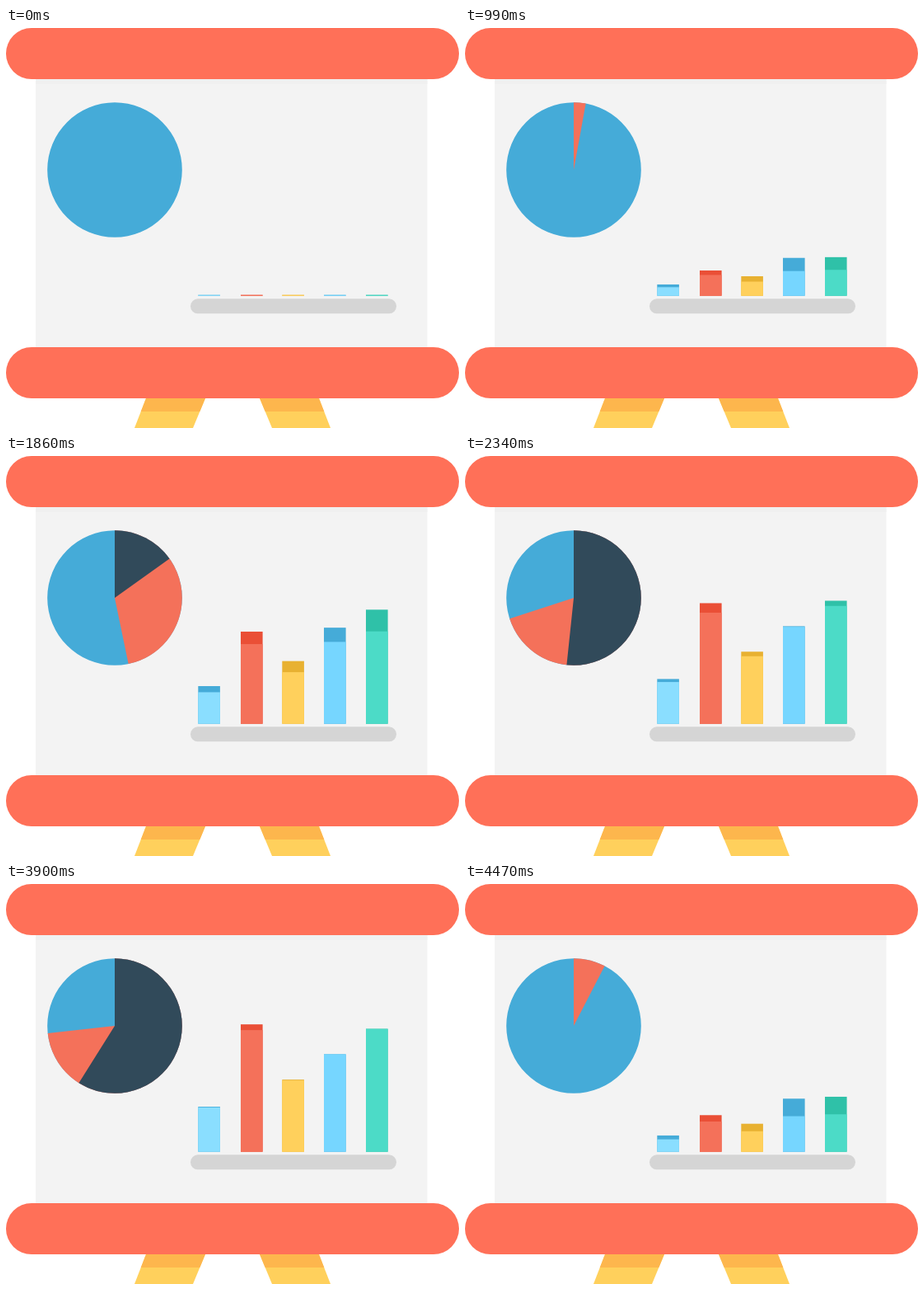
Write an HTML page with a canvas that moves like this. It is 550x485 px and loops after 4.5 s.

```html
<!DOCTYPE html>
<html lang="en">
<head>
<meta charset="utf-8">
<title>Presentation board</title>
<style>
  html, body { margin: 0; width: 100%; height: 100%; overflow: hidden; background: #fff; }
  canvas { display: block; width: 550px; height: 485px; }
</style>
</head>
<body>
<canvas id="stage" width="550" height="485"></canvas>
<script>
const ctx = document.getElementById('stage').getContext('2d');

const LOOP = 4500, STEP = 30;
const BUILD_END = 3030, REWIND_START = 3780, REWIND_RATE = 2.5;
const BAR_START = 100, BAR_BASE = 324.7;
const PIE = { x: 132, y: 172, r: 81.8 };
const BLUE = '#45abd8', RED = '#f4715a', DARK = '#314a5a', BOARD = '#ff7058';

// Each bar has a shaded bar that rises first and a light one that catches up.
const bars = [
  { x: 233.3, top: 270, shade: BLUE, fill: '#8adeff', shadeEnd: 2470, fillEnd: 2810 },
  { x: 285, top: 168.5, shade: '#ea4f36', fill: RED, shadeEnd: 2770, fillEnd: 3030 },
  { x: 335.3, top: 237.2, shade: '#e8b131', fill: '#ffd05c', shadeEnd: 2385, fillEnd: 2770 },
  { x: 386, top: 206.4, shade: BLUE, fill: '#76d6ff', shadeEnd: 2010, fillEnd: 2460 },
  { x: 437, top: 175.5, shade: '#2fc1a8', fill: '#4cdbc7', shadeEnd: 2225, fillEnd: 2680 }
];

// cubic-bezier(.464, 0, .621, 1), solved by bisection
function ease(u) {
  if (u <= 0) return 0;
  if (u >= 1) return 1;
  let lo = 0, hi = 1;
  for (let i = 0; i < 24; i++) {
    const v = (lo + hi) / 2, w = 1 - v;
    const x = 3 * 0.464 * v * w * w + 3 * 0.621 * v * v * w + v * v * v;
    if (x < u) lo = v; else hi = v;
  }
  return lo * lo * (3 - 2 * lo);
}

const progress = (s, start, end) => ease((s - start) / (end - start));

function rect(x, y, w, h, color) {
  ctx.fillStyle = color;
  ctx.fillRect(x, y, w, h);
}

function pill(x, y, w, h, color) {
  ctx.fillStyle = color;
  ctx.beginPath();
  ctx.roundRect(x, y, w, h, h / 2);
  ctx.fill();
}

function leg(topX, bottomX) {
  ctx.save();
  ctx.beginPath();
  ctx.moveTo(topX, 449);
  ctx.lineTo(topX + 72, 449);
  ctx.lineTo(bottomX + 71, 485);
  ctx.lineTo(bottomX, 485);
  ctx.clip();
  rect(150, 440, 250, 45, '#ffd05c');
  rect(150, 440, 250, 25, '#fdb64d');
  ctx.restore();
}

function slice(degrees, color) {
  if (degrees <= 0) return;
  ctx.fillStyle = color;
  ctx.beginPath();
  ctx.moveTo(PIE.x, PIE.y);
  ctx.arc(PIE.x, PIE.y, PIE.r, -Math.PI / 2, (degrees - 90) * Math.PI / 180);
  ctx.fill();
}

function drawBoard() {
  rect(0, 0, 550, 485, '#fff');
  leg(170, 156);
  leg(308, 323);
  rect(36, 60, 475.5, 330, '#f3f3f3');
  rect(36, 60, 475.5, 8, '#f0f0f0');
  pill(0, 0, 550, 62, BOARD);
  pill(0, 387, 550, 62, BOARD);
  pill(224, 328.3, 250, 18, '#d5d5d5');
}

function drawBar(bar, s) {
  const full = BAR_BASE - bar.top;
  const part = (end, color) => {
    const h = Math.max(1, full * progress(s, BAR_START, end));
    rect(bar.x, BAR_BASE - h, 26.6, h, color);
  };
  part(bar.shadeEnd, bar.shade);
  part(bar.fillEnd, bar.fill);
}

function draw(s) {
  drawBoard();
  slice(360, BLUE);
  slice(263.7 * progress(s, 699, 2596), RED);
  slice(212.3 * progress(s, 1402, 2610), DARK);
  bars.forEach(bar => drawBar(bar, s));
}

// Build up, hold, then rewind faster until the loop cuts back.
function sceneTime(t) {
  if (t < REWIND_START) return Math.min(t, BUILD_END);
  return 2890 - (t - REWIND_START) * REWIND_RATE;
}

let began = null;
function tick(now) {
  if (began === null) began = now;
  const t = Math.floor(((now - began) % LOOP) / STEP) * STEP;
  draw(sceneTime(t));
  requestAnimationFrame(tick);
}

draw(0);
requestAnimationFrame(tick);
</script>
</body>
</html>
```
